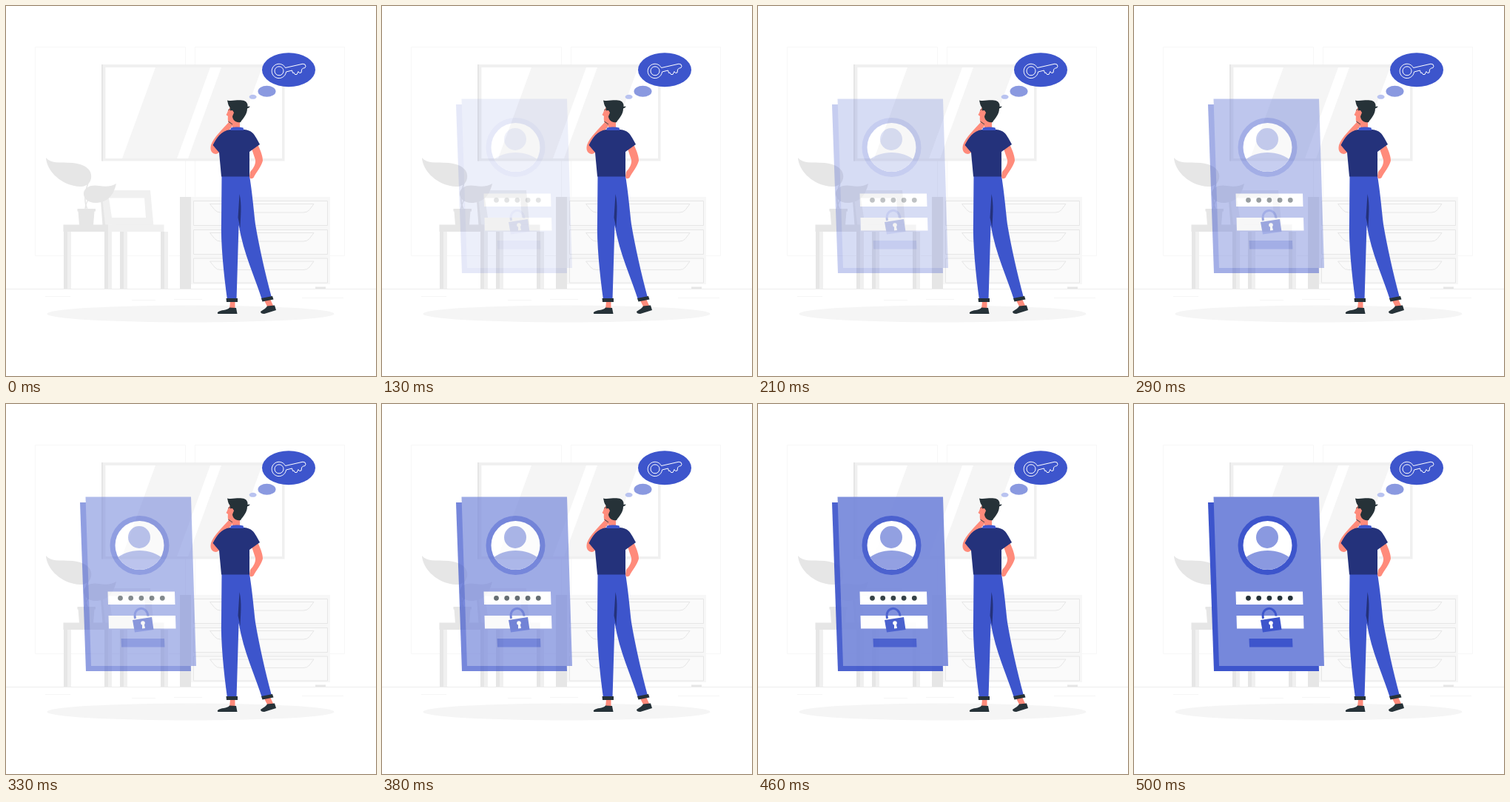
An HTML page for the animation above (0.54 s loop, 500 by 500 pixels).

```html
<!DOCTYPE html>
<html lang="en">
<head>
<meta charset="utf-8">
<title>Forgotten password</title>
<style>
html, body { margin: 0; height: 100%; overflow: hidden; background: #fff; }
svg { display: block; width: 100vw; height: 100vh; }
.blue { fill: #3d55cc; }
.navy { fill: #24327b; }
.dark { fill: #263238; }
.skin { fill: #ff8b7b; }
.soft { fill: #8a99e0; }
.g1 { fill: #e6e6e6; }
.g2 { fill: #f0f0f0; }
.g3 { fill: #f5f5f5; }
.white { fill: #fff; }
.line { fill: none; stroke: #e6e6e6; }
</style>
</head>
<body>
<svg viewBox="0 0 500 500">
  <defs>
    <g id="drawer">
      <path fill="#fafafa" stroke="#e6e6e6" d="M253.500 263.500h181v33h-181z"/>
      <path class="line" d="M275.500 267.500H416L410 275.500Q407 279 402 279H290Q285 279 282 275.500Z"/>
    </g>
    <g id="legs">
      <path class="g1" d="M0 305h6v77h-6zM55 305h5.500v77h-5.500z"/>
      <path class="g2" d="M5 305h5v77h-5zM60 305h5v77h-5z"/>
    </g>
    <clipPath id="disc"><circle cx="180.500" cy="191" r="33"/></clipPath>
  </defs>

  <!-- room -->
  <path fill="none" stroke="#f7f7f7" d="M39.500 55.500h203v282h-203zM255.500 55.500h202v282h-202z"/>
  <path class="line" stroke-opacity=".7" d="M0 382.500H500"/>
  <path class="line" stroke-opacity=".4" d="M53 392.500h34M170 397.500h32M227 396.500h38M400 394.500h56"/>
  <path class="g2" d="M130 79H376.500V209.500H130z"/>
  <path class="g1" d="M129 79h2v130.500h-2z"/>
  <path class="white" d="M134.500 83H373V206H134.500z"/>
  <path class="g3" d="M202 83H276L231 206H157zM291 83H346L301 206H246z"/>

  <!-- chair, table, plant -->
  <path class="g1" d="M127 249H133L138 303H131z"/>
  <path class="g2" fill-rule="evenodd" d="M129 249H195L200 303H135zM139 259.500L143 286H189L187 259.500z"/>
  <path class="g2" d="M143 295.500h70.500v9.500h-70.500z"/>
  <use href="#legs" x="154"/><path class="white" d="M219 305h1v77h-1z"/>
  <use href="#legs" x="203" display="none"/>
  <path class="g1" d="M77.500 295.500H138V305H77.500z"/>
  <path class="g2" d="M138 295.500h10v9.500h-10z"/>
  <use href="#legs" x="78"/>
  <path class="line" stroke-width="1.500" d="M113 234C107 248 104 262 110 275M117 256Q108 262 107 274"/>
  <path class="g1" d="M54 205C60 213 72 211 90 212C108 214 117 222 115 233C113 243 103 246 92 243C72 239 55 222 54 205z"/>
  <path class="g1" d="M149 240C145 258 135 266 121 266C110 266 104 259 105 252C107 244 116 241 126 243C136 245 144 243 149 240z"/>
  <path class="g1" d="M96.500 274H121V277.500H119.500L118 296H99L97.500 277.500H96.500z"/>

  <!-- dresser -->
  <path fill="#f7f7f7" d="M250 258H438V376H250z"/>
  <path class="g1" d="M235 258h15v124h-15zM418 379.500h14v2.500h-14z"/>
  <use href="#drawer"/><use href="#drawer" y="39"/><use href="#drawer" y="77.500"/>
  <ellipse class="g3" cx="249.500" cy="416" rx="194" ry="11.500"/>

  <!-- login card -->
  <g id="card" opacity="0">
    <path class="blue" d="M100 133H243L250 361H108z"/>
    <path fill="#7688db" d="M107.500 125.500H250L257 354H115z"/>
    <circle class="blue" cx="180.500" cy="191" r="40"/>
    <circle class="white" cx="180.500" cy="191" r="33"/>
    <g class="soft" clip-path="url(#disc)">
      <circle cx="180" cy="180" r="15"/>
      <path d="M148 210C164 194 197 194 213 210V230H148z"/>
    </g>
    <path class="white" d="M137.500 253.500H228L228.500 271H138zM138.500 286H229L229.500 303.500H139z"/>
    <path class="dark" stroke="#263238" stroke-width="6.800" stroke-linecap="round" stroke-dasharray="0 14.200" d="M154.500 262.300H212"/>
    <path class="blue" d="M155.500 317H214L214.500 328.500H156z"/>
    <path class="blue" d="M171 292L197 288L199.500 305L174 308.500z"/>
    <path fill="none" stroke="#3d55cc" stroke-width="3" d="M174.500 290C171 273 191 272 192 286.500"/>
    <path class="white" d="M184 297L186.500 296.500L188 303L184 303.500z"/>
    <circle class="white" cx="185" cy="296" r="2.800"/>
  </g>

  <!-- thought bubbles -->
  <ellipse class="blue" cx="382" cy="86.200" rx="36" ry="23"/>
  <ellipse class="soft" cx="352.500" cy="115.300" rx="12" ry="7.500"/>
  <ellipse fill="#b9c3f0" cx="333.600" cy="122.800" rx="5" ry="3"/>
  <g fill="none" stroke="#fff" stroke-linejoin="round">
    <circle cx="369" cy="87.800" r="6"/>
    <path d="M377.500 83.500L401 78.200Q405 78 405 81.500Q404.500 84.500 401.500 84L399.500 86L399 90L396.500 90.500L395 88.500L393 92.500L390.500 92.500L389 90L387.500 90.500L386.500 87L378.500 89A9.700 9.700 0 1 1 377.500 83.500z"/>
  </g>

  <!-- man -->
  <path class="skin" d="M303 399H309.500V410H302zM349 398L357 396L362 407L354 408z"/>
  <path class="dark" d="M286 414C290 410 299 412 302 407.500L311 408L312.500 416H288Q285 416 286 414zM344 413C348 410 351 409 353 405.500L363 404.500L365 411L349 416Q344 416 344 413z"/>
  <path class="blue" d="M291.500 229H329C333 255 334 268 337 295C342 325 350 360 359 394L346 397C337 368 321 335 314.500 296L311.500 397H299C294 360 290 320 291 290z"/>
  <path class="navy" d="M315.500 254L313.500 286L316.500 300C317 283 319 270 315.500 254z"/>
  <path class="dark" d="M297.500 395H313V400H298zM345 395L360 392L361.500 396.500L346.500 399.500z"/>
  <path class="skin" d="M340 187C345 197 347 204 347 209C345 217 338 225 334.500 232C332 234 329 234 329 230L330 224C336 218 337.500 212 337 208L332 193z"/>
  <path class="skin" d="M301 157C293 166 280 178 277 188C275 196 279 200 284 200C288 199 290 196 292 190L300 169L307 161z"/>
  <path class="skin" d="M303 137C299 141 300 144 297.500 147L300 149C299 156 301 160 306 160L306 167H316V150L312 138z"/>
  <path class="dark" d="M299 127.500C305 129 312 126.500 319 127.500C325 128 327 132 326.500 136L329.500 135.500L329 137L326 138.500C326 147 320 152 317 157C311 158.500 306 154 306 149L308 144L306 141L303 141.500L302.500 137C300 134 300 131 299 127.500z"/>
  <path class="skin" d="M303 142C305 141 308 143 307 146Q306 149 304 149z"/>
  <path fill="none" stroke="#263238" stroke-width=".9" d="M300.500 140.500l2-.8M300.500 156L306 160"/>
  <path class="navy" d="M303 167H322C332 168 335 173 338 178L343 187L329 197L329 230.500H291L288 198L279.500 188C285 178 290 169 303 167z"/>
  <path class="blue" d="M304 164.500Q312 162.500 320.500 164.500L321.500 168H303z"/>
</svg>
<script>
const LOOP = 540;
const card = document.getElementById("card");
const times = [130, 170, 210, 250, 290, 330, 380, 420, 460, 500];
const levels = [.13, .2, .29, .38, .47, .57, .7, .83, .92, 1];

function draw() {
  const t = performance.now() % LOOP;
  const step = times.filter(start => start <= t).length;
  card.setAttribute("opacity", step ? levels[step - 1] : 0);
  requestAnimationFrame(draw);
}
draw();
</script>
</body>
</html>
```
